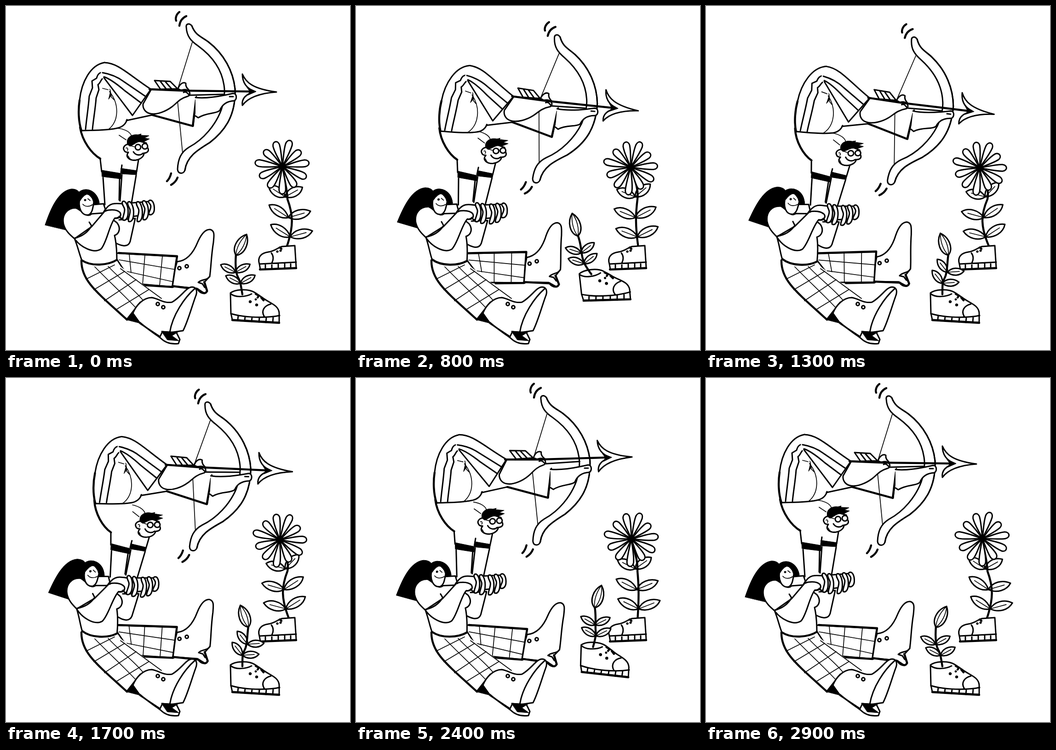
Write an HTML page that moves like this. It is 748x748 px and loops after 3 s.

```html
<!DOCTYPE html>
<html lang="en">
<head>
<meta charset="utf-8">
<title>Archer acrobats</title>
<style>
html, body { margin: 0; width: 100%; height: 100%; overflow: hidden; background: #fff }
svg { display: block; width: 100vw; height: 100vh }
path, circle, ellipse { fill: #fff; stroke: #000; stroke-width: 3; stroke-linecap: round; stroke-linejoin: round }
.line { fill: none }
.thin { fill: none; stroke-width: 1.7 }
.bold { fill: none; stroke-width: 4.4 }
.ink { fill: #000; stroke-width: 1 }
.bare { stroke: none }
</style>
</head>
<body>
<svg viewBox="0 0 748 748">
  <g id="torso">
    <path class="bare" d="M161 262C168 296 188 322 206 334L214 440H270L289 335L272 285L245 262Z"/>
    <path class="line" d="M205 334L208 360M211 373L215 432M247 375L246 422M252 346L250 362M252 367L248 424M288 335L284 360M283 368L273 428"/>
    <path class="bold" d="M161 264C166 294 186 321 205 332"/>
    <path class="thin" d="M244 266C260 268 272 275 273 284M246 281L261 291"/>
    <path class="ink" d="M208 357L250 364V376L209 371ZM250 353L285 358L284 367L251 365Z"/>
    <path d="M270 300C258 300 253 308 257 314C259 319 264 318 266 318C258 329 270 337 283 335C294 333 300 326 300 320C310 319 311 313 308 308L305 298L284 292Z"/>
    <path class="line" d="M277 317C282 325 292 326 298 320"/>
    <path class="thin" d="M266 326C269 335 278 338 286 334M261 309C264 307 266 311 264 314M279 306L271 304"/>
    <path class="ink" d="M264 301C260 287 272 278 287 280L294 278L293 281L311 282L301 287L312 289L300 295C288 293 281 299 276 302L270 305Z"/>
    <circle cx="287" cy="307" r="6" stroke-width="2.4"/><circle cx="302" cy="305" r="6" stroke-width="2.4"/>
  </g>

  <g id="legs">
    <path d="M262 249L318 237L407 261L414 197"/>
    <path class="bold" d="M318 237L406 261L413 205"/>
    <path d="M392 46C391 39 398 36 404 43C412 64 424 66 440 78C474 104 494 142 498 180C500 236 478 270 443 297C415 314 393 328 389 357C386 366 374 366 373 355C374 333 380 318 398 307C430 290 456 258 468 226C474 208 477 190 474 172C468 132 444 106 418 87C402 76 393 66 392 46Z"/>
    <path class="line" stroke-width="4.4" d="M404 43C412 64 424 66 440 78C474 104 494 142 498 180C500 236 478 270 443 297C415 314 393 328 389 357"/>
    <path d="M412 199C430 201 455 198 475 194L494 190C502 190 503 203 496 206C481 207 470 214 465 227C457 235 436 231 418 243L412 239"/>
    <path class="line" d="M486 197L494 197"/>
    <path class="thin" d="M405 79L373 182M373 206L384 320"/>
    <path class="bold" d="M377 13C370 18 368 27 370 32M392 22C381 27 378 35 377 43M359 364C357 372 354 377 350 381M373 373C370 381 366 385 359 389"/>
    <path class="bare" d="M164 271C156 250 157 224 160 205C164 165 184 128 214 123C240 124 260 145 315 181L275 238L225 184C245 215 247 250 225 268Z"/>
    <path class="bold" d="M164 271C157 250 157 224 160 205"/>
    <path class="line" d="M160 205C164 165 184 128 214 123M164 271C195 270 215 271 240 266C253 264 261 256 263 247"/>
    <path class="thin" d="M225 186C246 212 247 250 222 269M210 179L222 182M226 180L229 198L235 204"/>
    <path class="line" stroke-width="6.5" d="M212 146C204 142 199 149 197 157L187 163L188 178L181 196C179 222 175 246 173 268"/>
    <path class="line" stroke-width="6" d="M212 157C207 157 206 167 200 171L202 182L196 200C194 226 190 246 188 268"/>
    <path class="ink" d="M227 186L223 203L229 194Z"/>
    <g id="shin">
      <path class="bare" d="M214 123C244 124 265 147 315 181L275 238L213 165L206 146Z"/>
      <path class="line" d="M214 123C244 124 265 148 315 181L275 238L213 156"/>
      <path class="line" stroke-width="6" d="M210 145C222 147 240 152 257 165L304 197"/>
      <path class="line" stroke-width="5.5" d="M213 154C228 159 244 172 258 184L294 211"/>
      <path d="M323 162L357 164L373 180L336 181ZM335 163L348 180M346 164L360 180"/>
      <path d="M374 180C377 171 384 164 391 168C390 175 394 179 398 183L396 190Z"/>
      <path d="M316 181L382 183C397 178 405 191 396 196C376 202 372 211 361 219C348 229 328 237 314 234C303 232 297 223 298 213Z"/>
      <path class="line" d="M386 188C391 185 394 189 397 192"/>
      <path class="line" d="M399 194L474 192"/>
      <path class="bold" d="M312 181L384 184L540 186"/>
      <path d="M514 148C521 165 535 180 588 187C548 190 525 201 514 216C512 202 520 192 541 186C522 179 514 166 514 148Z"/>
      <path class="ink" d="M524 177L544 186L526 194L530 186Z"/>
    </g>
  </g>

  <g id="backLeg">
    <path d="M232 537L372 545L364 611L275 603Z"/>
    <path class="bold" d="M245 537L372 544L362 611L300 607"/>
    <path class="thin" d="M268 540L272 580M302 542L297 606M340 544L334 608M246 552L368 573M262 577L365 600"/>
    <path d="M372 556C396 554 409 533 417 513C424 497 433 485 444 486C455 489 452 501 451 514C446 544 446 568 443 588L432 600L438 620L432 625L415 614L362 609L368 570Z"/>
    <path class="bold" d="M362 609L417 616C424 626 436 627 437 619L431 600"/>
    <path class="line" d="M443 588C436 598 426 593 418 601L427 604L432 612"/>
    <circle cx="377" cy="570" r="3.4" stroke-width="2"/><circle cx="393" cy="566" r="3.4" stroke-width="2"/>
  </g>

  <g id="frontLeg">
    <path class="bare" d="M164 553C163 595 197 622 263 682L304 633L338 637L241 560Z"/>
    <path class="bold" d="M164 553C163 597 197 622 263 682L292 645"/>
    <path class="thin" d="M249 571L338 636M193 567C225 600 256 628 283 657M222 566C250 596 277 614 298 640M174 594L236 563M191 617L258 577M214 641L283 595M238 661L310 617"/>
    <path d="M276 668C283 650 299 634 317 634C334 637 342 647 361 644C382 632 392 611 405 611C416 612 416 623 412 632C403 657 395 687 385 706L357 710L340 708L335 719L291 690Z"/>
    <path class="line" d="M411 614C388 634 362 672 356 710"/>
    <path class="line" d="M291 688C306 701 325 714 336 722C346 732 360 736 375 734L378 725L371 711"/>
    <path class="ink" d="M262 682L277 668L293 690ZM338 707L374 709L361 717L376 728L351 726Z"/>
    <circle cx="330" cy="648" r="3.4" stroke-width="2"/><circle cx="342" cy="655" r="3.4" stroke-width="2"/>
  </g>

  <g id="woman">
    <path d="M246 465L281 462L270 512C266 524 254 524 236 514"/>
    <path class="ink" d="M85 476C96 444 112 403 141 398C150 397 157 401 159 405C172 393 197 399 203 428L196 432L160 450L131 487Z"/>
    <path d="M190 432L212 430L216 442L196 474L168 470Z"/>
    <path d="M152 439C132 439 121 455 125 474C129 490 142 500 149 506C156 522 160 542 165 553C186 567 222 564 241 552C241 533 240 515 236 499C247 495 250 482 241 471L212 450L186 452C176 462 166 445 152 439Z"/>
    <path d="M161 414C155 440 165 457 180 454C189 449 189 436 191 426L186 411L174 408Z"/>
    <path class="ink" d="M158 405C172 392 199 400 203 429L193 431C190 420 183 413 178 409C171 410 166 416 161 424Z"/>
    <path class="thin" stroke-width="2.2" d="M167 431C172 437 181 437 188 432M178 419L183 423"/>
    <circle class="ink" cx="172" cy="422" r="2"/>
    <path class="bold" d="M165 553C186 567 222 564 241 552"/>
    <path d="M149 506L186 480L214 447C225 442 240 441 249 445C253 454 247 461 236 462C224 479 219 514 207 528C190 540 161 523 149 506Z"/>
    <path class="line" d="M149 505C161 502 176 496 186 478L181 470"/>
    <path d="M216 443C226 427 238 429 252 430L312 425L322 438L312 452L250 462C243 450 230 444 216 445"/>
    <path class="bare" d="M216 444L236 461L248 455L230 434Z"/>
    <path class="line" d="M216 445C230 442 242 443 248 449C252 457 246 463 237 461"/>
    <g id="fingers"></g>
  </g>

  <g id="flower"></g>
  <path d="M551 561C546 546 555 537 570 535C585 533 590 526 600 523L628 521L631 569L553 573Z"/>
  <path class="line" d="M551 561L631 557M577 537C583 545 581 553 578 559M564 561V571M578 560V571M592 559V571M606 558V570M619 558V570"/>
  <path class="bold" d="M552 573L631 570M595 525L599 528"/>
  <circle class="ink" cx="590" cy="534" r="2.2"/><circle class="ink" cx="597" cy="532" r="2.2"/>

  <g id="hopper">
    <path d="M488 624C500 615 528 615 541 623L556 633C572 646 592 649 594 667V688L492 682L489 668Z"/>
    <path class="line" d="M489 669C520 678 565 679 595 673M562 676C553 662 563 651 576 648M505 673L504 682M520 675L519 684M535 677L534 686M551 678L550 687M566 678L565 688M581 676L580 688"/>
    <path class="bold" d="M492 683L594 689M543 626L550 630L547 634M555 634L560 640"/>
    <path class="line" d="M489 626C500 635 523 632 534 626"/>
    <circle class="ink" cx="531" cy="643" r="2.8"/><circle class="ink" cx="545" cy="650" r="2.8"/><circle class="ink" cx="543" cy="638" r="2"/>
    <g id="sprout"></g>
  </g>
</svg>

<script>
const $ = id => document.getElementById(id);
const move = (id, value) => $(id).setAttribute('transform', value);
const times = [0, 400, 800, 1300, 1700, 2400, 2900];

// Monotone cubic through values v at times x
function ease(t, v, x = times) {
  let i = 0;
  while (i < x.length - 2 && t >= x[i + 1]) i++;
  const slope = k => {
    const n = x.length - 1, j = (k + n) % n;
    return (v[j + 1] - v[j]) / (x[j + 1] - x[j]);
  };
  const tangent = k => {
    const a = slope(k - 1), b = slope(k);
    return a * b > 0 ? 2 * a * b / (a + b) : 0;
  };
  const h = x[i + 1] - x[i], u = Math.min(1, (t - x[i]) / h), w = 1 - u;
  return w * w * ((1 + 2 * u) * v[i] + u * h * tangent(i)) +
         u * u * ((3 - 2 * u) * v[i + 1] - w * h * tangent(i + 1));
}

const path = (d, cls = '', extra = '') => `<path class="${cls}" d="${d}" ${extra}/>`;

function leaf(x, y, angle, length, wide) {
  const l = length;
  return `<g transform="translate(${x} ${y}) rotate(${angle})">` +
    path(`M0 0C${l * .25} ${-wide} ${l * .7} ${-wide} ${l} 0C${l * .75} ${wide} ${l * .3} ${wide} 0 0Z`, '', 'stroke-width="2.5"') +
    path(`M0 0L${l * .72} 0`, 'thin') + '</g>';
}

function flower(p) {
  const s = 1 - 2 * p, x = 601 - 6 * p, y = 349 + 3 * p;
  const pair = (nx, ny, left, right, l) =>
    leaf(nx, ny, left + 9 * s, l, 13) + leaf(nx, ny, right + 9 * s, l, 13);
  let out = pair(607, 415, 204, -38, 43) +
    pair(609 + 5 * s, 460, 204, -25, 50) + pair(613 + 5 * s, 502, 203, -24, 50) +
    path(`M${613 - 2 * s} 522C${611 + 14 * s} 480 ${611 + 14 * s} 455 612 420C${614 - 2 * s} 400 ${607 - 2 * s} 380 ${x} ${y}`, 'bold');
  for (let i = 0; i < 11; i++) {
    const l = 56 + 4 * Math.sin(i * 2.3);
    out += `<g transform="translate(${x} ${y}) rotate(${254 + i * 360 / 11 + 8 * p})">` +
      path(`M0 0C${l * .4} -4 ${l * .6} -8 ${l * .85} -7.5C${l * 1.05} -6 ${l * 1.05} 6 ${l * .85} 7C${l * .6} 7 ${l * .4} 4 0 0Z`) + '</g>';
  }
  return out + `<circle class="ink" cx="${x}" cy="${y}" r="5"/>`;
}

function sprout(t) {
  const low = ease(t, [510, 510, 500, 514, 514, 519, 510]);
  const mid = ease(t, [499, 499, 496, 525, 525, 516, 499]);
  const top = ease(t, [500, 500, 492, 527, 527, 513, 500]);
  const tilt = ease(t, [27, 22, -9, -20, -20, 14, 27]);
  const turn = ease(t, [0, 0, -4, 25, 25, 0, 0]);
  const pair = (x, y) => leaf(x, y, 207 + turn, 36, 10) + leaf(x, y, -29 + turn, 36, 10);
  return pair(mid, 579) + pair(low, 603) +
    path(`M514 627C${low} 604 ${low} 600 ${(low + mid) / 2} 590S${2 * mid - (mid + top) / 2} 560 ${top} 540`, 'bold') +
    `<g transform="translate(${top} 542) rotate(${tilt})">` +
    path('M0 0C-16 -10 -15 -36 0 -51C15 -36 16 -10 0 0Z') +
    path('M0 0C-7 -15 -6 -35 0 -51C7 -35 7 -15 0 0', 'thin') + '</g>';
}

$('fingers').innerHTML = [[259, 445, 20], [271, 447, 21], [290, 447, 21], [303, 444, 20], [316, 438, 15]]
  .map(([x, y, h]) => `<g transform="translate(${x} ${y}) rotate(-4)">` +
    path(`M-4 ${-h}C3 ${-h - 4} 8 -8 6 6C5 ${h * .8} 0 ${h + 3} -6 ${h}C-8 ${h - 5} 0 4 -1 -4C-2 -10 -8 ${-h + 4} -4 ${-h}Z`) + '</g>').join('');

const hopTimes = [0, 500, 650, 800, 950, 1200, 1300, 1900, 2100, 2250, 2400, 2600, 2750, 2900];

function draw(t) {
  const p = ease(t, [0, .25, .62, 1, .95, .35, 0]);
  const swing = ease(t, [0, 2, 5.3, 6.2, 2.7, -.3, 0]);
  const hop = ease(t, [0, 0, -25, -48, -40, 8, 0, 0, -25, -48, -40, -10, 0, 0], hopTimes);
  const lean = ease(t, [0, 0, -4, -5, 2, 0, 0, 0, -4, -5, 3, 1, 0, 0], hopTimes);
  move('torso', `matrix(${1 + .005 * p} ${.1025 * p} ${-.124 * p} ${1 - .04 * p} ${64.6 * p} ${-3.9 * p})`);
  move('legs', `translate(${32 * p} ${2 * p}) rotate(${swing} 163 270)`);
  move('shin', `rotate(${ease(t, [0, 0, 0, 0, -.8, -2.1, 0])} 212 140)`);
  move('woman', `rotate(${5 * p} 200 560)`);
  move('backLeg', `rotate(${ease(t, [0, -1.4, -4.4, -4.9, -1.3, .8, 0])} 250 560)`);
  move('hopper', `translate(0 ${hop}) rotate(${lean} 560 655)`);
  $('flower').innerHTML = flower(p);
  $('sprout').innerHTML = sprout(t);
}

function tick() {
  draw(Math.floor(performance.now() % 3000 / 100) * 100);
  requestAnimationFrame(tick);
}
tick();
</script>
</body>
</html>
```
